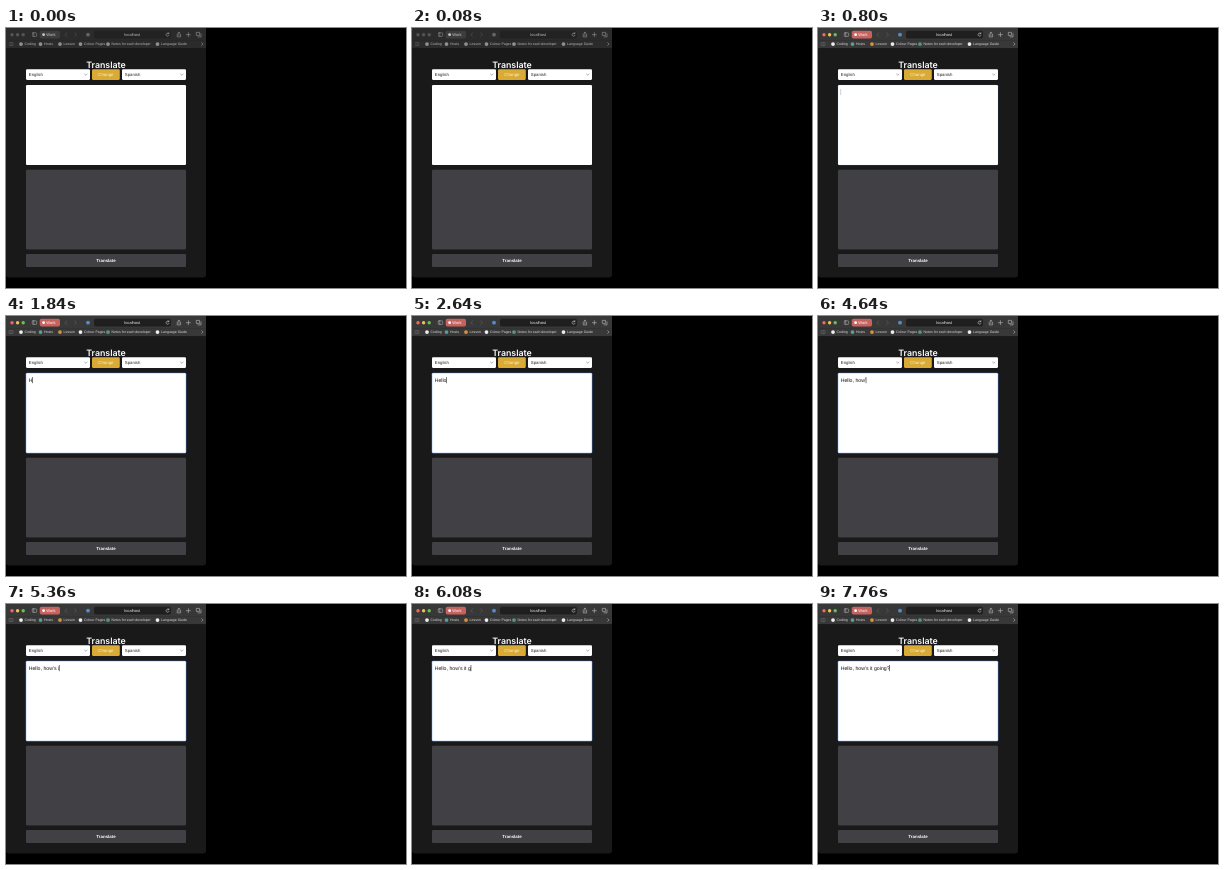
Write an HTML page that moves like this. It is 400 by 260 pixels and loops after 8 s.

```html
<!DOCTYPE html>
<html lang="en">
<head>
<meta charset="utf-8">
<title>Translate</title>
<style>
html, body { margin: 0; width: 100%; height: 100%; overflow: hidden; background: #000; }
svg { display: block; width: 400px; height: 260px; }
text { font-family: "Liberation Sans", Arial, sans-serif; text-rendering: geometricPrecision; white-space: pre; }
.mid { text-anchor: middle; }
.line { fill: none; stroke-width: .6; stroke-linecap: round; stroke-linejoin: round; }
.ui { font-size: 4.3px; }
</style>
</head>
<body>
<svg viewBox="0 0 400 260">
  <rect width="400" height="260" fill="#000"/>
  <rect y="-4" width="200" height="253.6" rx="3" fill="#191919"/>
  <rect id="bar" width="200" height="20.5"/>
  <rect y="12.3" width="200" height=".4" fill="#222" opacity=".5"/>
  <rect y="20.3" width="200" height=".5" fill="#0e0e0e"/>

  <g id="lights"></g>
  <g id="tools">
    <rect class="line" x="26.3" y="4.8" width="4.4" height="3.6" rx=".7" stroke="#aaa"/>
    <path class="line" d="M27.8 4.8v3.6" stroke="#aaa"/>
    <rect id="pill" x="33.7" y="2.8" width="20.3" height="7.8" rx="1.8"/>
    <circle cx="37.6" cy="6.7" r="1.4" fill="#fff"/>
    <text x="40.3" y="8.1" font-size="4" fill="#fff">Work</text>
    <path class="line" d="M60.6 5l-1.7 1.7 1.7 1.7M68.8 5l1.7 1.7-1.7 1.7" stroke="#686868"/>
    <circle id="badge" cx="82" cy="6.7" r="1.9"/>
    <rect x="88" y="2.8" width="77" height="7.8" rx="1.8" fill="#1f1f20"/>
    <text class="mid" x="126.2" y="8.1" font-size="4" fill="#eee">localhost</text>
    <path class="line" d="M162.8 5.6a1.6 1.6 0 1 0 .3 1.7M162.9 4.5v1.3h-1.3" stroke="#bbb"/>
    <path class="line" d="M171.2 6.3v2.6h3.4V6.3M172.9 7.5V4.3M171.8 5.2l1.1-1 1.1 1" stroke="#bbb"/>
    <path class="line" d="M180.4 6.7h4M182.4 4.7v4" stroke="#bbb"/>
    <path class="line" d="M190.7 4.4h2.9v3h-2.9zM192 8.9h3V5.8" stroke="#bbb"/>
  </g>
  <g id="marks">
    <path class="line" d="M3.4 14.7h3.6v2.8H3.4zM5.2 14.7v2.8" stroke="#666"/>
    <path class="line" d="M195.7 14.8l1.3 1.3-1.3 1.3" stroke="#bbb"/>
  </g>

  <text class="mid" x="100" y="40" font-size="8.8" font-weight="600" fill="#fff" style="font-family:Inter,'Liberation Sans',sans-serif">Translate</text>
  <g class="ui">
    <rect x="20" y="41.3" width="64" height="10.6" rx="1.1" fill="#fff"/>
    <text x="22.8" y="48.1" fill="#222">English</text>
    <path class="line" d="M78.6 46.1l1.2 1.1 1.2-1.1" stroke="#777"/>
    <rect x="86" y="41.3" width="27.8" height="10.6" rx="1.1" fill="#d9ab36"/>
    <text class="mid" x="99.9" y="48.1" fill="#fff2cc">Change</text>
    <rect x="116" y="41.3" width="64" height="10.6" rx="1.1" fill="#fff"/>
    <text x="118.8" y="48.1" fill="#222">Spanish</text>
    <path class="line" d="M174.6 46.1l1.2 1.1 1.2-1.1" stroke="#777"/>
  </g>

  <rect id="ring" x="19.4" y="56.5" width="161.2" height="81.2" rx="1.7" fill="#26365c"/>
  <rect x="20" y="57.1" width="160" height="80" rx="1.1" fill="#fff"/>
  <rect id="edge" x="20.2" y="57.3" width="159.6" height="79.6" rx="1" fill="none" stroke="#86b7fe" stroke-width=".4"/>
  <text id="typed" x="22.7" y="65.9" font-size="5.2" fill="#111"></text>
  <rect id="caret" y="61" width=".6" height="6.2" fill="#222"/>

  <rect x="20" y="141.8" width="160" height="79.6" rx="1.1" fill="#404045"/>
  <rect x="20" y="226" width="160" height="13" rx="1.1" fill="#404045"/>
  <text class="mid" x="100" y="234" font-size="4.4" font-weight="700" fill="#fff">Translate</text>
</svg>
<script>
const LOOP = 8000, ACTIVE = 800;
const MESSAGE = "Hello, how's it going?";
// [time in ms, characters shown]
const KEYS = [
  [1760, 1], [2080, 2], [2320, 3], [2480, 4], [2640, 5], [3200, 6], [3760, 8],
  [3920, 9], [4080, 10], [4640, 11], [4960, 12], [5360, 14], [5520, 15], [5680, 16],
  [6080, 17], [6160, 18], [6560, 19], [6720, 20], [7360, 21], [7760, 22]
];
const CARET_OFF = [[0, ACTIVE], [1440, 1760], [3440, 3760]];
const LIGHTS = ["#ee6a5f", "#f5bd4f", "#61c454"];
const BOOKMARKS = [
  [15, "#eee", "Coding"], [34.5, "#5b9e94", "Hosts"], [54, "#d9913c", "Lesson"],
  [74.5, "#eee", "Colour Pages"], [102, "#4d9a88", "Notes for each developer"],
  [151.5, "#eee", "Language Guide"]
];

const $ = id => document.getElementById(id);
const clamp = v => Math.max(0, Math.min(1, v));

function add(parent, tag, attrs, text = "") {
  const el = document.createElementNS("http://www.w3.org/2000/svg", tag);
  for (const key in attrs) el.setAttribute(key, attrs[key]);
  el.textContent = text;
  return parent.appendChild(el);
}

const lights = LIGHTS.map((color, i) =>
  add($("lights"), "circle", { cx: 6 + i * 5.6, cy: 6.7, r: 1.7 }));
const icons = BOOKMARKS.map(([x, color, label]) => {
  add($("marks"), "text", { x: x + 3.6, y: 17.3, "font-size": 3.5, fill: "#ddd" }, label);
  return add($("marks"), "circle", { cx: x, cy: 16.1, r: 1.9 });
});

function draw(t) {
  const active = t >= ACTIVE;
  const tint = (on, off) => active ? on : off;
  $("bar").setAttribute("fill", tint("#383838", "#2b2b2b"));
  $("pill").setAttribute("fill", tint("#c8625e", "#444"));
  $("badge").setAttribute("fill", tint("#4f8fd0", "#777"));
  $("tools").setAttribute("opacity", tint(1, .75));
  $("marks").setAttribute("opacity", tint(1, .8));
  lights.forEach((el, i) => el.setAttribute("fill", tint(LIGHTS[i], "#555")));
  icons.forEach((el, i) => el.setAttribute("fill", tint(BOOKMARKS[i][1], "#aaa")));

  const focus = active ? clamp((t - ACTIVE + 80) / 240) : 0;
  $("ring").setAttribute("opacity", focus);
  $("edge").setAttribute("opacity", focus);

  const count = KEYS.reduce((n, [at, size]) => t >= at ? size : n, 0);
  const typed = $("typed");
  typed.textContent = MESSAGE.slice(0, count);
  const width = count ? typed.getComputedTextLength() : 0;
  const hidden = CARET_OFF.some(([from, to]) => t >= from && t < to);
  $("caret").setAttribute("x", 22.5 + width);
  $("caret").setAttribute("opacity", hidden ? 0 : focus);
}

const start = performance.now();
function tick() {
  draw((performance.now() - start) % LOOP);
  requestAnimationFrame(tick);
}
tick();
</script>
</body>
</html>
```
